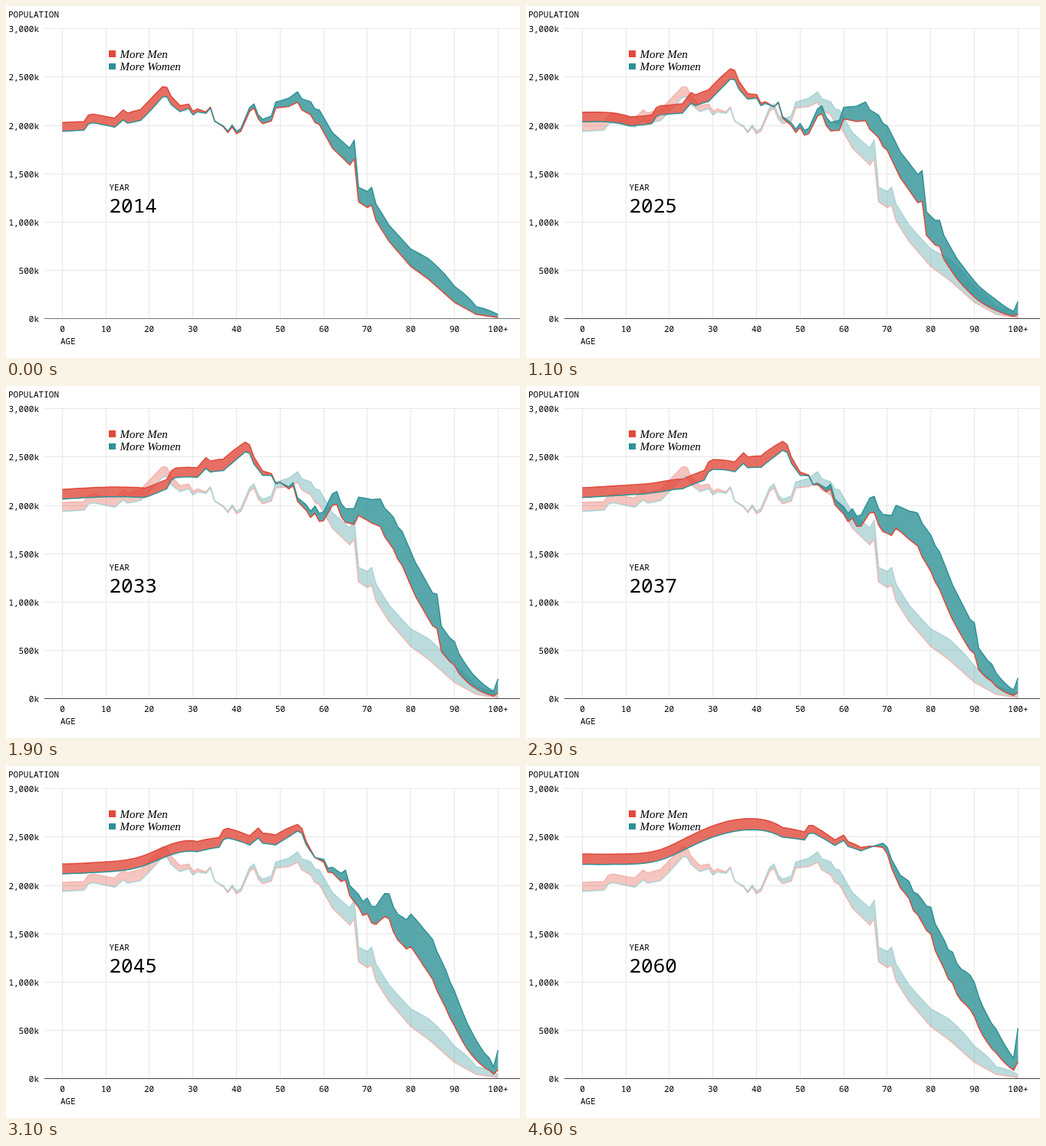
An HTML page that plays this animation: 670 by 460 pixels, repeating every 4.7 s.

```html
<!DOCTYPE html>
<html lang="en">
<head>
<meta charset="utf-8">
<title>Population by age</title>
<style>
html, body { margin: 0; width: 100%; height: 100%; overflow: hidden; background: #fff; }
svg { display: block; font: 11px "Noto Sans Mono", monospace; }
.grid line { stroke: #e8e8e8; }
.legend { font: italic 15px "Liberation Serif", serif; }
.line { fill: none; stroke-width: 1.5; stroke-linejoin: round; }
.area { fill-opacity: .8; }
.men.line { stroke: #de4a3c; }
.women.line { stroke: #2e9296; }
.men.area, .men.key { fill: #e24a3b; }
.women.area, .women.key { fill: #2e9296; }
</style>
</head>
<body>
<svg width="670" height="460" viewBox="0 0 670 460">
  <g class="grid" id="grid"></g>
  <g id="past" opacity=".4"></g>
  <g id="now"></g>
  <line id="axis" x1="50" x2="670" y1="408.5" y2="408.5"/>
  <text x="3" y="15">POPULATION</text>
  <text x="71" y="442">AGE</text>
  <g id="ticks"></g>
  <g class="legend">
    <rect class="men key" x="134" y="58" width="9" height="9"/>
    <text x="148.500" y="68">More Men</text>
    <rect class="women key" x="134" y="75" width="9" height="8"/>
    <text x="148.500" y="84">More Women</text>
  </g>
  <text x="134.500" y="241">YEAR</text>
  <text id="year" x="134.500" y="270" font-size="26"></text>
</svg>
<script>
const START = 2014, YEARS = 47, STEP_MS = 100, OLDEST = 100;
const { exp, floor } = Math;
const $ = id => document.getElementById(id);
const ages = [...Array(OLDEST + 1).keys()];
const px = age => 73.3 + 5.68 * age;
const py = thousands => 408.7 - thousands * 379 / 3000;
const mix = (a, b, t) => a + (b - a) * t;

// Turning points of the men's curve in the first year: age, thousands
const turns = {
  0: 2030, 5: 2040, 6: 2105, 7: 2118, 12: 2075, 14: 2160, 15: 2128, 18: 2165,
  23: 2400, 24: 2395, 25: 2300, 27: 2205, 29: 2220, 30: 2145, 31: 2170, 33: 2140,
  34: 2190, 35: 2045, 37: 1985, 38: 1925, 39: 1985, 40: 1915, 41: 1940, 43: 2145,
  44: 2180, 45: 2065, 46: 2018, 48: 2045, 49: 2180, 52: 2195, 54: 2240, 55: 2160,
  57: 2110, 58: 2030, 59: 2010, 62: 1765, 66: 1590, 67: 1655, 68: 1210, 70: 1150,
  71: 1175, 72: 1015, 75: 800, 80: 540, 84: 410, 90: 170, 95: 45, 100: 12
};
// Logarithm of women per man in the first year, by decade of age
const balance = [-.046, -.044, -.053, -.017, .012, .031, .077, .135, .288, .68, 1.3];

function polyline(points, x) {
  const xs = Object.keys(points).map(Number);
  const i = Math.max(1, xs.findIndex(v => v >= x));
  const a = xs[i - 1], b = xs[i];
  return mix(points[a], points[b], (x - a) / (b - a));
}

// Catmull-Rom through evenly spaced values
function spline(list, x) {
  const i = Math.min(floor(x), list.length - 2), t = x - i;
  const at = n => list[Math.max(0, Math.min(list.length - 1, n))];
  const [a, b, c, d] = [at(i - 1), at(i), at(i + 1), at(i + 2)];
  return b + t / 2 * (c - a + t * (2 * a - 5 * b + 4 * c - d + t * (3 * (b - c) + d - a)));
}

// Yearly rates; t counts years from the start
const births = t => 2030 + 105 * (1 - exp(-t / 5)) + .09 * t * t;
function migration(age, t) {
  const spread = age < 22 ? 6 : 12;
  const young = .0064 * exp(-(((age - 22) / spread) ** 2));
  const steady = .0025 / (1 + exp((age - 45) / 3));
  return (young + steady) * (1.3 - .45 * exp(-t / 10));
}
// Gompertz mortality that improves with time, most for the younger
const mortality = (sex, age, t) =>
  sex.risk * exp(sex.ageing * (age - 80.5) - .0004 * t * (98 - age));

const sexes = {
  men: { risk: .06, ageing: .093, newborn: 1 },
  women: { risk: .0396, ageing: .105, newborn: .954 }
};

function nextYear(sex, people, t) {
  const next = [sex.newborn * births(t + 1)];
  people.forEach((n, age) => {
    const to = Math.min(age + 1, OLDEST), a = age + .5, mid = t + .5;
    next[to] = (next[to] || 0) + n * exp(migration(a, mid) - mortality(sex, a, mid));
  });
  return next;
}

const firstMen = ages.map(age => polyline(turns, age));
const firstWomen = ages.map(age => firstMen[age] * exp(spline(balance, age / 10)));
const history = [{ men: firstMen, women: firstWomen }];
for (let t = 0; t < YEARS - 1; t++) {
  history.push({
    men: nextYear(sexes.men, history[t].men, t),
    women: nextYear(sexes.women, history[t].women, t)
  });
}

// Points of both curves, with one more wherever they cross
function curvePoints({ men, women }) {
  const points = [];
  men.forEach((m, age) => {
    const w = women[age];
    if (age) {
      const before = men[age - 1] - women[age - 1], after = m - w;
      if (before * after < 0) {
        const t = before / (before - after), n = mix(men[age - 1], m, t);
        points.push({ age: age - 1 + t, men: n, women: n });
      }
    }
    points.push({ age, men: m, women: w });
  });
  return points;
}

function chart(people) {
  const points = curvePoints(people);
  const trace = (list, value) =>
    list.map(p => px(p.age).toFixed(2) + ',' + py(value(p)).toFixed(2)).join('L');
  const top = trace(points, p => Math.max(p.men, p.women));
  const back = [...points].reverse();
  const area = (sex, other) =>
    `<path class="${sex} area" d="M${top}L${trace(back, p => p[other])}Z"/>`;
  const line = sex => `<path class="${sex} line" d="M${trace(points, p => p[sex])}"/>`;
  return area('men', 'women') + area('women', 'men') + line('men') + line('women');
}

function drawScale() {
  let grid = '', ticks = '';
  for (let n = 0; n <= 3000; n += 500) {
    const y = floor(py(n)) + .5;
    grid += `<line x1="50" x2="670" y1="${y}" y2="${y}"/>`;
    ticks += `<text x="43" y="${y + 4.5}" text-anchor="end">${n.toLocaleString('en-US')}k</text>`;
  }
  for (let age = 0; age <= OLDEST; age += 10) {
    const x = floor(px(age)) + .5;
    const label = age + (age === OLDEST ? '+' : '');
    grid += `<line x1="${x}" x2="${x}" y1="29" y2="408"/>`;
    ticks += `<text x="${x}" y="426" text-anchor="middle">${label}</text>`;
  }
  $('grid').innerHTML = grid;
  $('ticks').innerHTML = ticks;
}

let shown = -1;
function draw(time) {
  const step = floor(time / STEP_MS) % YEARS;
  if (step !== shown) {
    shown = step;
    $('now').innerHTML = chart(history[step]);
    $('past').style.display = step ? '' : 'none';
    $('axis').setAttribute('stroke', step ? '#444' : '#777');
    $('year').textContent = START + step;
  }
  requestAnimationFrame(draw);
}

drawScale();
$('past').innerHTML = chart(history[0]);
draw(0);
</script>
</body>
</html>
```
